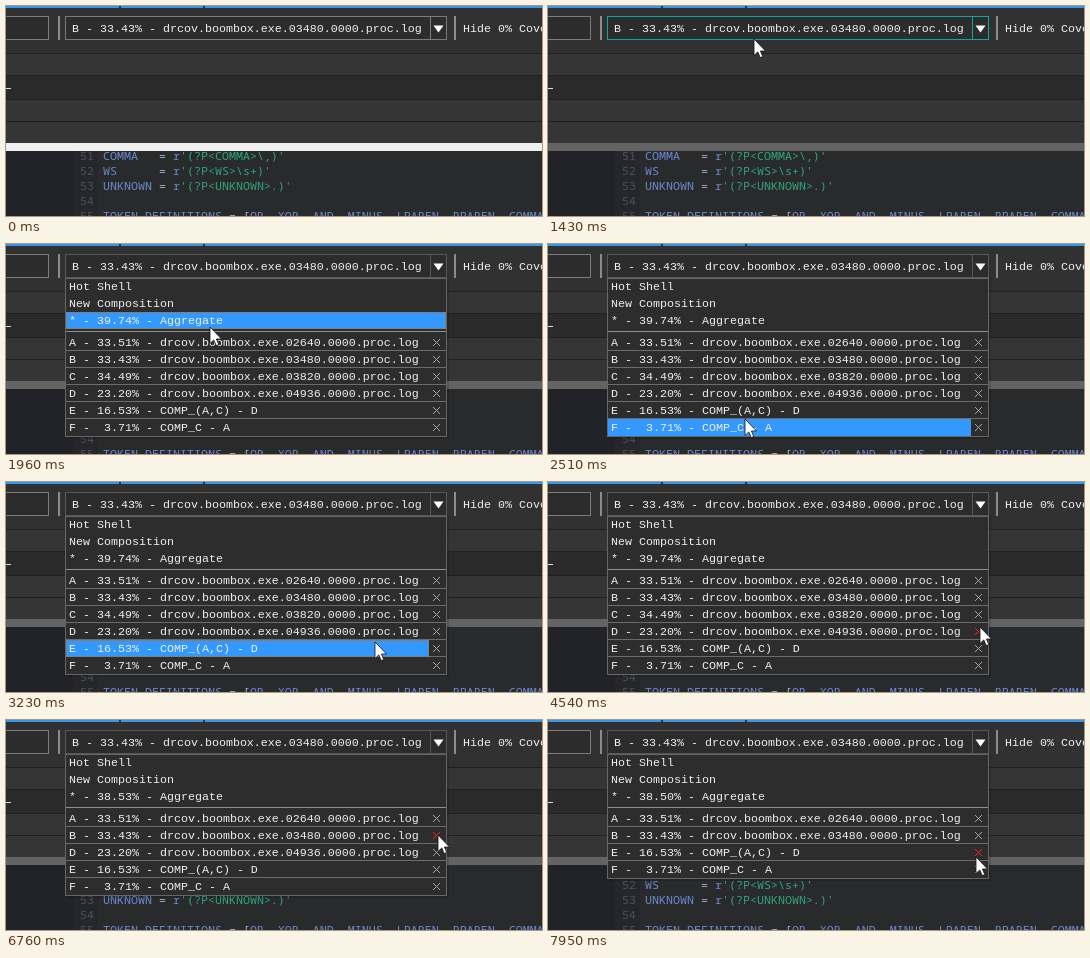
Recreate the animation shown at these times as an HTML page. Size 536 by 210 pixels, loop 8 s.

```html
<!DOCTYPE html>
<html lang="en">
<head>
<meta charset="utf-8">
<title>Coverage selector</title>
<style>
  html, body { margin: 0; width: 100%; height: 100%; overflow: hidden; background: #313131; }
  svg { display: block; }
  text {
    font: 11.665px "Liberation Mono", monospace;
    fill: #efefef;
    white-space: pre;
  }
  .code text { font-family: "Noto Sans Mono", monospace; fill: #6b8ad0; }
  .code .num { fill: #4d505c; }
  .code .op { fill: #a9b0bd; }
  .code .str { fill: #2fa57c; }
  .cross { stroke: #a6a6a6; fill: none; }
  .cross.hot { stroke: #f02424; }
</style>
</head>
<body>
<svg width="536" height="210" viewBox="0 0 536 210">
  <g shape-rendering="crispEdges">
    <rect width="536" height="210" fill="#313131"/>
    <rect width="536" height="2" fill="#3399f0"/>
    <path d="M113 0h2v2h-2zM197 0h2v2h-2z" fill="#1c3a58"/>
    <rect y="48" width="536" height="89" fill="#353535"/>
    <rect y="70" width="536" height="24" fill="#2a2a2a"/>
    <path d="M0 47.5h536M0 69.5h536M0 93.5h536M0 115.5h536" stroke="#202020"/>
    <rect y="82" width="5" height="1" fill="#dcdcdc"/>
    <rect id="splitter" y="137" width="536" height="8"/>
    <rect y="145" width="536" height="65" fill="#292a2c"/>
    <rect y="145" width="67" height="65" fill="#222229"/>
    <rect x="67" y="145" width="25" height="65" fill="#26272b"/>
    <rect x="-5.5" y="10.5" width="48" height="23" fill="#2c2c2c" stroke="#7c7c7c"/>
    <path d="M53 10v24M449 10v24" stroke="#8c8c8c" stroke-width="2"/>
    <path id="combo" d="M59.5 10.5h381v23h-381zM424.5 11v22" fill="#2c2c2c"/>
  </g>
  <path d="M427.5 19.5h10l-5 7z" fill="#fff"/>
  <text x="66" y="26">B - 33.43% - drcov.boombox.exe.03480.0000.proc.log</text>
  <text x="457" y="26">Hide 0% Coverage</text>

  <svg y="145" width="536" height="65" viewBox="0 145 536 65" class="code">
    <text x="74" y="154" class="num">51</text>
    <text x="97" y="154">COMMA   <tspan class="op">= </tspan>r<tspan class="str">'(?P&lt;COMMA&gt;\,)'</tspan></text>
    <text x="74" y="169" class="num">52</text>
    <text x="97" y="169">WS      <tspan class="op">= </tspan>r<tspan class="str">'(?P&lt;WS&gt;\s+)'</tspan></text>
    <text x="74" y="184" class="num">53</text>
    <text x="97" y="184">UNKNOWN <tspan class="op">= </tspan>r<tspan class="str">'(?P&lt;UNKNOWN&gt;.)'</tspan></text>
    <text x="74" y="199" class="num">54</text>
    <text x="74" y="214" class="num">55</text>
    <text x="97" y="214">TOKEN_DEFINITIONS <tspan class="op">= [</tspan>OR, XOR, AND, MINUS, LPAREN, RPAREN, COMMA</text>
  </svg>

  <rect id="shadow" x="61" y="34" width="382" fill="#000" opacity=".15"/>
  <svg id="popup" x="59" y="34" width="382">
    <g id="menu">
      <rect id="panel" x=".5" y=".5" width="381" fill="#2d2d2d" stroke="#666"/>
      <path d="M1 53.5h380" stroke="#8e8e8e"/>
    </g>
  </svg>
  <path id="pointer" d="M0 0V16.5L3.8 12.9 6.2 18.6 8.8 17.5 6.4 12H11.5Z" fill="#fff" stroke="#111" stroke-width=".8"/>
</svg>
<script>
const LOOP = 8000, OPEN = 1560, ROLL = 150, ROW = 17, TOP = 34, CROSS_X = 424;
const $ = id => document.getElementById(id);
const log = n => `drcov.boombox.exe.${n}.0000.proc.log`;

// gone: time at which the row is deleted
const rows = [
  { label: 'Hot Shell' },
  { label: 'New Composition' },
  { label: '* - 39.74% - Aggregate' },
  { label: 'A - 33.51% - ' + log('02640'), set: true },
  { label: 'B - 33.43% - ' + log('03480'), set: true },
  { label: 'C - 34.49% - ' + log('03820'), set: true, gone: 5010 },
  { label: 'D - 23.20% - ' + log('04936'), set: true, gone: 7900 },
  { label: 'E - 16.53% - COMP_(A,C) - D', set: true },
  { label: 'F -  3.71% - COMP_C - A', set: true }
];
const aggregate = rows[2], current = rows[4];

// time, x, y
const path = [
  [690, 21, 30], [970, 204, 33], [1240, 204, 33], [1250, 206, 33], [OPEN, 206, 33],
  [1960, 204, 83], [2200, 200, 153], [2250, 199, 160], [2510, 197, 175], [2620, 197, 179],
  [2710, 197, 179], [3000, 300, 168], [3230, 369, 160], [3550, 424, 150], [3740, 432, 148],
  [4490, 432, 148], [4730, 430, 136], [4960, 430, 136], [5250, 428, 139], [5430, 428, 139],
  [5480, 428, 138], [5720, 428, 132], [6090, 428, 132], [6380, 434, 99], [6660, 434, 99],
  [6910, 428, 138], [7420, 428, 138], [7520, 428, 137]
];

function add(parent, tag, attrs) {
  const node = document.createElementNS('http://www.w3.org/2000/svg', tag);
  set(node, attrs);
  return parent.appendChild(node);
}

function set(node, attrs) {
  for (const key in attrs) node.setAttribute(key, attrs[key]);
}

for (const row of rows) {
  const width = row.set ? 363 : 380;
  row.g = add($('menu'), 'g', {});
  row.bar = add(row.g, 'rect', { x: 1, width, height: ROW, fill: '#3399ff' });
  row.focus = add(row.g, 'rect', {
    x: 1.5, y: .5, width: width - 1, height: ROW - 1,
    fill: 'none', stroke: '#cc6600', 'stroke-dasharray': '1 1', 'stroke-dashoffset': .5
  });
  row.text = add(row.g, 'text', { x: 4, y: 12 });
  row.text.textContent = row.label;
  if (!row.set) continue;
  row.cross = add(row.g, 'path', { d: 'M368 5l7 7M375 5l-7 7' });
  if (row !== rows[rows.length - 1]) {
    row.line = add(row.g, 'path', { d: 'M1 16.5h380', stroke: '#6c6c6c' });
    row.g.insertBefore(row.line, row.bar);
  }
}

function pointerAt(t) {
  const next = path.findIndex(p => p[0] > t);
  if (next === 0) return { x: -50, y: 0 };
  if (next < 0) return { x: path.at(-1)[1], y: path.at(-1)[2] };
  const [t0, x0, y0] = path[next - 1], [t1, x1, y1] = path[next];
  const k = (t - t0) / (t1 - t0);
  return { x: Math.round(x0 + (x1 - x0) * k), y: Math.round(y0 + (y1 - y0) * k) };
}

const visibleRows = t => rows.filter(row => !(t >= row.gone));
const rowTop = (row, i) => i * ROW + (row.set ? 5 : 0);
const show = (node, on) => { node.style.display = on ? '' : 'none'; };

function hoverAt(t) {
  const { x, y } = pointerAt(t);
  const row = y < TOP ? current : visibleRows(t).find((r, i) => {
    const offset = y - TOP - rowTop(r, i);
    return offset >= 0 && offset < ROW;
  });
  return { row, onCross: x >= CROSS_X };
}

function drawMenu(t) {
  const shown = visibleRows(t), height = shown.length * ROW + 6;
  const open = Math.max(0, Math.min(1, (t - OPEN) / ROLL));
  const hover = hoverAt(t), settled = hoverAt(t - 40).row === hover.row;
  const visible = height * open;
  set($('popup'), { height: visible });
  set($('menu'), { transform: `translate(0 ${visible - height})` });
  set($('panel'), { height: height - 1 });
  set($('shadow'), { height: open ? visible + 2 : 0 });

  aggregate.text.textContent = `* - ${t < 5010 ? '39.74' : t < 7900 ? '38.53' : '38.50'}% - Aggregate`;
  for (const row of rows) {
    const i = shown.indexOf(row), active = row === hover.row, lit = active && !hover.onCross;
    show(row.g, i >= 0);
    set(row.g, { transform: `translate(0 ${rowTop(row, i)})` });
    show(row.bar, lit);
    show(row.focus, lit && settled);
    if (row.cross) set(row.cross, { class: active && hover.onCross ? 'cross hot' : 'cross' });
  }
}

function draw(t) {
  const { x, y } = pointerAt(t);
  set($('pointer'), { transform: `translate(${x} ${y})` });
  set($('splitter'), { fill: t < 1430 ? '#f0f0f0' : '#636363' });
  set($('combo'), { stroke: t < 780 ? '#7c7c7c' : t < OPEN ? '#12a5a0' : '#585858' });
  show($('popup'), t > OPEN);
  drawMenu(t);
}

const start = performance.now();
function tick() {
  draw((performance.now() - start) % LOOP);
  requestAnimationFrame(tick);
}
tick();
</script>
</body>
</html>
```
